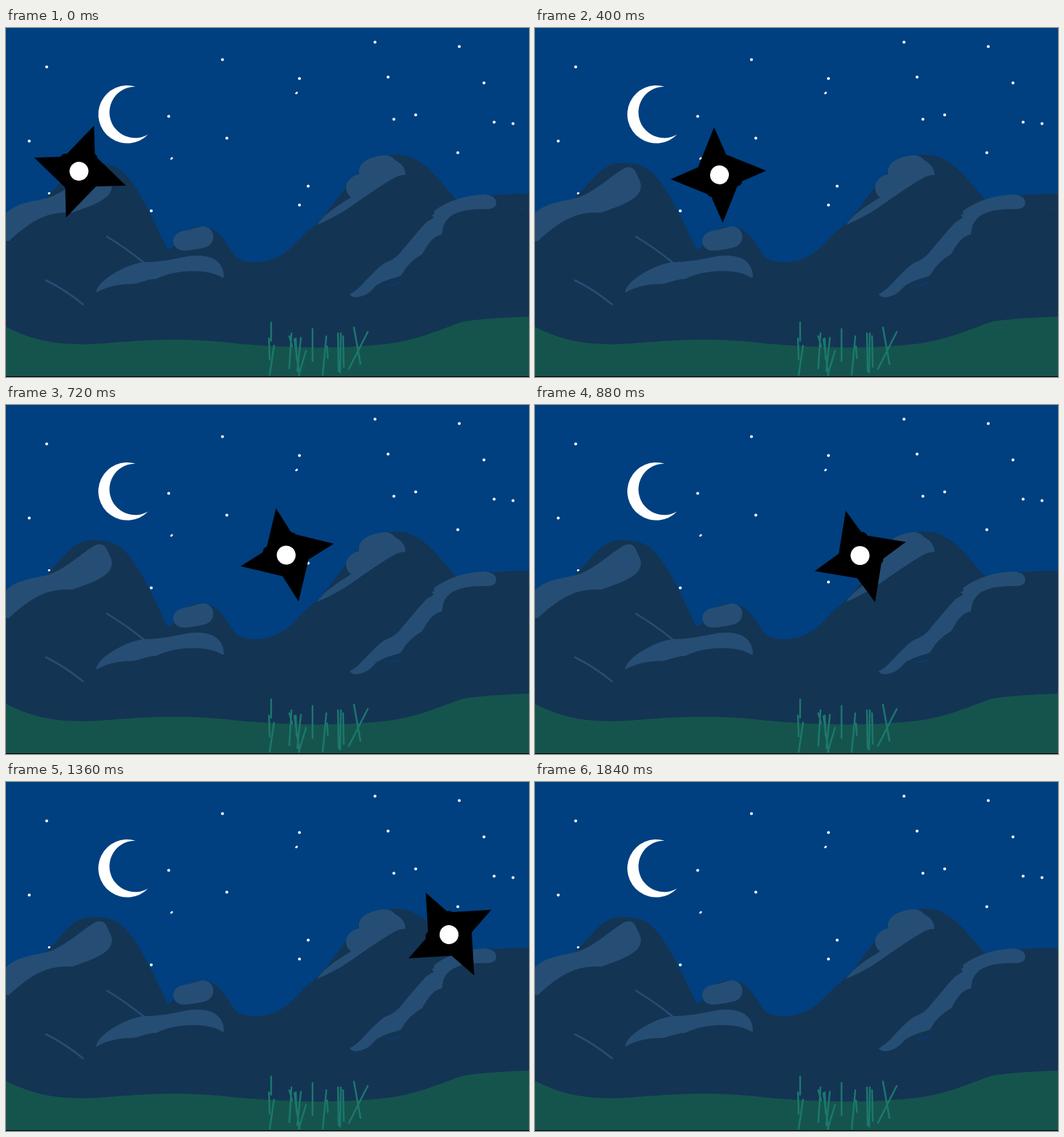
An HTML page that plays this animation: 720x480 px, repeating every 1920 ms.

```html
<!DOCTYPE html>
<html lang="en">
<head>
<meta charset="utf-8">
<title>Throwing star at night</title>
<style>
  html, body { margin: 0; width: 100%; height: 100%; overflow: hidden; background: #004080; }
  svg { display: block; }
  .line { fill: none; stroke-linecap: round; }
</style>
</head>
<body>
<svg width="720" height="480" viewBox="0 0 720 480">
  <rect width="720" height="480" fill="#004080"/>

  <!-- stars and moon -->
  <g class="line" stroke="#fff" transform="translate(0 .4)">
    <path stroke-width="4" d="M56 53h0M298 43h0M508 19h0M624 25h0M404 69h0M526 67h0M658 75h0M224 121h0M304 151h0M32 155h0
      M534 125h0M564 119h0M672 129h0M698 131h0M622 171h0M416 217h0M404 243h0M200 251h0"/>
    <path stroke-width="2.600" d="M399.500 89.500l1-1M227.500 179.500l1-1M59 227h1"/>
  </g>
  <path fill="#fff" d="M178.500 80.700A39.800 39.800 0 1 0 195.500 146.500A35.300 35.300 0 1 1 178.500 80.700Z"/>

  <!-- mountains -->
  <path fill="#143454" d="M0 256Q20 240 54 235C78 212 90 186 119 185.500C144 186 157 190 173 212C193 240 208 275 222 304
    Q228 305 233 296C241 281 256 273 268 273C296 272 306 304 318 316Q326 322 344 322C376 322 395 301 410 284L430 267
    C448 249 463 221 490 194Q514 174 537 174C574 174 595 209 620 236Q660 228 720 228V480H0Z"/>
  <g fill="#264e74">
    <path d="M0 255C14 241 34 239 52 235C78 230 102 205 121 194Q132 188 138 197L145 212C151 234 122 243 91 254C54 251 29 270 4 293H0Z"/>
    <path d="M245 279C257 277 264 273 273 273C289 275 289 296 276 301C263 305 250 306 242 306C226 303 226 282 245 279Z"/>
    <path d="M124 364C125 348 164 325 190 322C215 322 239 316 250 314C277 310 300 317 300 343H297C280 331 235 331 207 345C195 345 184 351 174 352C154 352 138 356 124 364Z"/>
    <path d="M428 271C437 257 455 245 475 233C463 223 467 206 486 201C484 184 501 178 519 175Q530 174 536 182C545 186 550 194 550 202Q541 202 533 207C507 222 486 238 465 252Q447 263 428 271Z"/>
    <path d="M473 366C487 361 502 336 522 323Q538 317 546 305C558 291 570 276 579 267L589 261L586 257L590 256L589 252C607 238 632 230 658 229Q675 230 675 241Q674 249 661 249C637 249 609 251 602 273L600 284C587 286 580 299 573 311Q554 322 546 337L543 341C529 345 512 350 506 358C496 370 478 374 473 366Z"/>
  </g>
  <path class="line" stroke="#264e74" stroke-width="2.600" d="M139 287Q164 302 189 322M55 347Q80 359 106 380"/>
  <path class="line" stroke="#004080" stroke-width="1.500" d="M527 354Q535 353 541 350M709 248.500h3"/>

  <!-- meadow -->
  <path fill="#15544d" d="M0 411C42 433 82 437 130 434C190 429 245 425 318 434C388 440 450 442 520 435C566 430 593 416 629 404Q656 399 720 397V480H0Z"/>
  <path class="line" stroke="#1b786d" stroke-width="2.400" d="M365 405v25M362 427l1 29M369 437l-6 40M393 420l-3 48M390 424l4 14
    M397 428l7 49M399 427l1 28M406 426l-5 46M413 444l-10 33M422 414v44M441 424l-5 53M442 438l1 16M457 420l1 52
    M461 420l-1 54M464 424l1 42M479 412l9 50M498 418l-26 51"/>
  <rect y="479" width="720" height="1"/>

  <g id="blade">
    <path id="points"/>
    <circle cx="-23" cy="-10" r="7.500"/>
    <circle cx="12" cy="-22" r="7.500"/>
    <circle r="13" fill="#fff"/>
  </g>
</svg>
<script>
const STEP = 80, STEPS = 24;
const $ = id => document.getElementById(id);

// four arms, each a tip and a notch, set slightly off the hub
const polar = (deg, r) => {
  const a = deg * Math.PI / 180;
  return `${1.5 + r * Math.cos(a)} ${r * Math.sin(a)}`;
};
const arms = [0, 90, 180, 270].map(deg => `${polar(deg - 1, 66)}L${polar(deg + 25, 30)}`);
$('points').setAttribute('d', `M${arms.join('L')}Z`);

// flight path as [step, x, y]
const path = [[0, 100.5, 197], [3, 184, 198], [7, 324, 206], [11, 447.5, 207],
  [14, 531, 210.5], [19, 662.5, 209.5], [24, 814, 209]];

function draw(now) {
  const step = Math.floor(now / STEP) % STEPS;
  const i = path.findIndex(p => p[0] > step);
  const from = path[i - 1], to = path[i];
  const t = (step - from[0]) / (to[0] - from[0]);
  const [, x, y] = from.map((v, j) => v + (to[j] - v) * t);
  // the spin starts slowly, then keeps a faster constant rate
  const turn = Math.max(18 + 24 * step, 42.9 * step - 38.7);
  $('blade').setAttribute('transform', `translate(${x} ${y}) rotate(${turn})`);
}

const start = performance.now();
function loop() {
  draw(performance.now() - start);
  requestAnimationFrame(loop);
}
loop();
</script>
</body>
</html>
```
